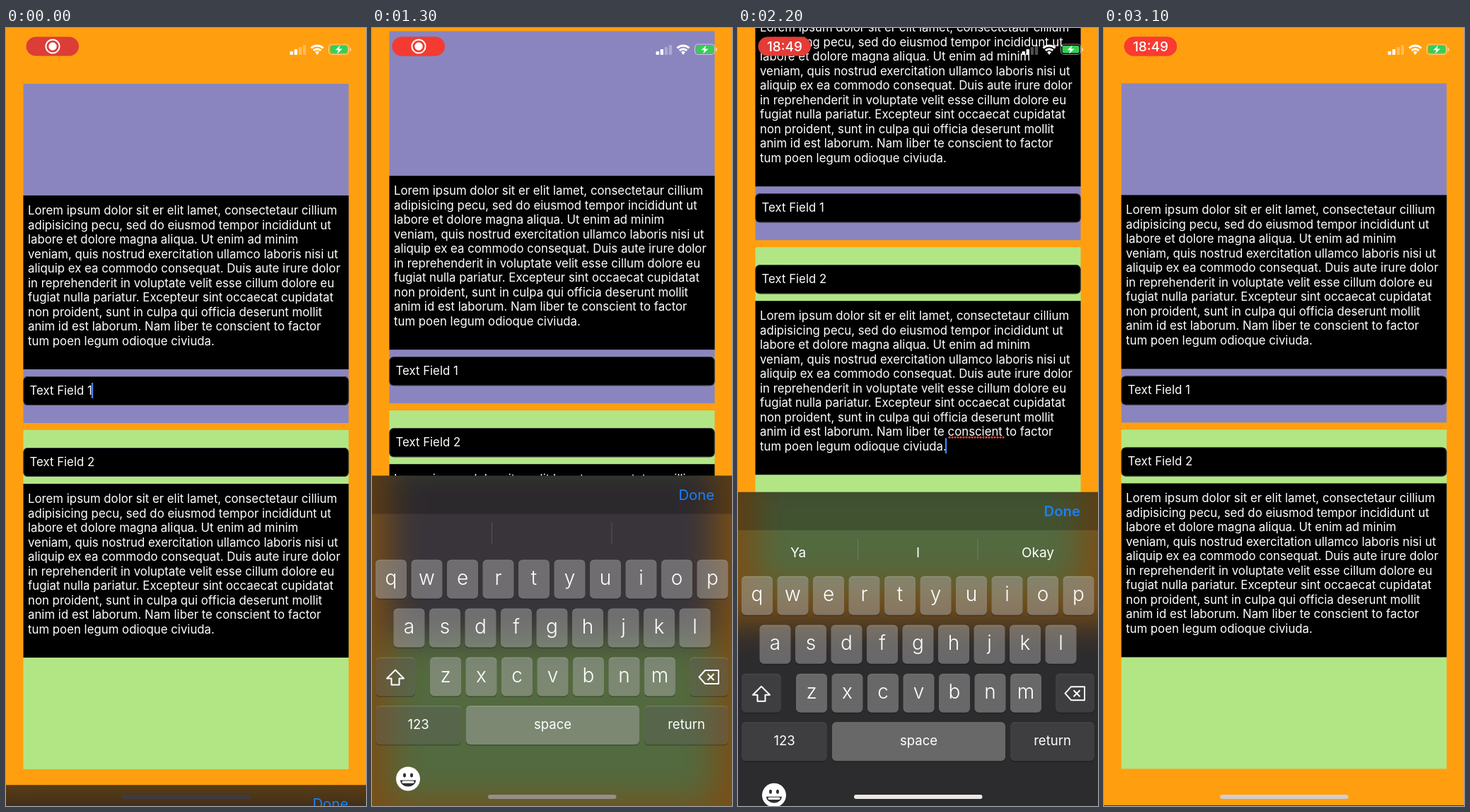
These frames come from a looping animation (509x1101 px, 3.2 s). An HTML page with a canvas:

```html
<!DOCTYPE html>
<html lang="en">
<head>
<meta charset="utf-8">
<title>Keyboard and text fields</title>
<style>
  html, body { margin: 0; width: 100%; height: 100%; overflow: hidden; background: #000; }
  canvas { display: block; width: 509px; height: 1101px; }
</style>
</head>
<body>
<canvas id="stage" width="509" height="1101"></canvas>
<script>
const W = 509, H = 1101, LOOP = 3200, STEP = 100, MARGIN = 80;
const KEYBOARD_HEIGHT = 479;
const FOCUS_1 = -22, FOCUS_2 = 580, DISMISS_1 = 1287, FOCUS_3 = 1965, DISMISS_2 = 2640;
const BLUE = '#1a80fb', RED = '#ff3b30';
const LOREM = [
  'Lorem ipsum dolor sit er elit lamet, consectetaur cillium',
  'adipisicing pecu, sed do eiusmod tempor incididunt ut',
  'labore et dolore magna aliqua. Ut enim ad minim',
  'veniam, quis nostrud exercitation ullamco laboris nisi ut',
  'aliquip ex ea commodo consequat. Duis aute irure dolor',
  'in reprehenderit in voluptate velit esse cillum dolore eu',
  'fugiat nulla pariatur. Excepteur sint occaecat cupidatat',
  'non proident, sunt in culpa qui officia deserunt mollit',
  'anim id est laborum. Nam liber te conscient to factor',
  'tum poen legum odioque civiuda.'
];
const PLAIN = { orange: '#ff9f0f', purple: '#8a85bf', green: '#b2e685', box: '#000', black: '#000' };
const DIMMED = { orange: '#7a4e16', purple: '#4a4860', green: '#53693f', box: '#38343a', black: '#2c2b2d' };
const INDICATOR = [
  [0, 61, 59, 66], [400, 86, 86, 98], [900, 128, 124, 122], [1500, 160, 152, 144],
  [2000, 216, 210, 203], [2400, 255, 255, 255], [3100, 207, 205, 208]
];

const ctx = document.getElementById('stage').getContext('2d');
const backdrop = document.createElement('canvas');
backdrop.width = W + 2 * MARGIN;
backdrop.height = H + 2 * MARGIN;
const backCtx = backdrop.getContext('2d');
const clamp = v => Math.max(0, Math.min(1, v));

// Critically damped spring, 0 to 1
function spring(ms) {
  const x = Math.max(0, ms) * 0.01826;
  return 1 - (1 + x) * Math.exp(-x);
}

function rect(x, y, w, h, color, g = ctx) {
  g.fillStyle = color;
  g.fillRect(x, y, w, h);
}

function roundPath(x, y, w, h, r) {
  ctx.beginPath();
  ctx.roundRect(x, y, w, h, r);
}

function roundRect(x, y, w, h, r, color) {
  roundPath(x, y, w, h, r);
  ctx.fillStyle = color;
  ctx.fill();
}

function disc(x, y, r, color) {
  ctx.beginPath();
  ctx.arc(x, y, r, 0, 7);
  ctx.fillStyle = color;
  ctx.fill();
}

function poly(points, close = true) {
  ctx.beginPath();
  points.forEach(([x, y]) => ctx.lineTo(x, y));
  if (close) ctx.closePath();
}

function text(str, x, y, size = 16.8, align = 'left', weight = 400, color = '#fff') {
  ctx.font = `${weight} ${size}px Inter, "Liberation Sans", sans-serif`;
  ctx.textAlign = align;
  ctx.fillStyle = color;
  ctx.fillText(str, x, y);
}

function panels(g, c, scroll, stretch) {
  const add = (x, y, w, h, color) => rect(x, y - scroll, w, h, color, g);
  const grow = 77 * stretch;
  add(-100, -400, W + 200, H + 400 + grow, c.orange);
  add(-100, H + grow, W + 200, 500, c.black);
  add(24.5, 79 - 49 * stretch, 460, 480 + 49 * stretch, c.purple);
  add(24.5, 569, 460, 480 + grow, c.green);
  add(24.5, 237, 460, 246, c.box);
  add(24.5, 645, 460, 246, c.box);
}

function caret(x, y) {
  rect(x, y, 2.4, 22, '#3f82ea');
}

function field(label, y) {
  roundRect(24.5, y, 460, 41, 6, '#000');
  roundPath(25, y + 0.5, 459, 40, 6);
  ctx.strokeStyle = '#38383b';
  ctx.lineWidth = 1;
  ctx.stroke();
  text(label, 33.5, y + 26);
}

function content(t) {
  field('Text Field 1', 493);
  field('Text Field 2', 594);
  for (const top of [237, 645])
    LOREM.forEach((line, i) => text(line, 31, top + 27 + i * 20.5));
  if (t < FOCUS_2) caret(120.8, 502);
  else if (t < DISMISS_1) caret(123, 603);
  else if (t >= FOCUS_3 && t < DISMISS_2) {
    caret(292.8, 839);
    for (let x = 299; x < 376; x += 4) disc(x, 838, 1.5, '#e8483c');
  }
}

function key(label, x, y, w, alpha, size) {
  roundRect(x, y + 1.5, w, 55, 6, 'rgba(0,0,0,.25)');
  roundRect(x, y, w, 55, 6, `rgba(255,255,255,${alpha})`);
  const big = size > 20;
  text(label, x + w / 2, y + (big ? 35 : 33), size, 'center', big ? 300 : 400);
}

function keyIcons() {
  ctx.strokeStyle = '#fff';
  ctx.lineWidth = 2;
  ctx.lineJoin = 'round';
  poly([[33, 275], [45, 287], [38.5, 287], [38.5, 296], [27.5, 296], [27.5, 287], [21, 287]]);
  ctx.stroke();
  poly([[462.5, 285], [471, 275.5], [490, 275.5], [490, 294.5], [471, 294.5]]);
  ctx.stroke();
  for (const s of [-1, 1]) {
    poly([[474.5, 285 - 4.5 * s], [483.5, 285 + 4.5 * s]], false);
    ctx.stroke();
  }
}

function smiley(x, y) {
  disc(x, y, 17, '#fff');
  ctx.fillStyle = '#303030';
  for (const s of [-1, 1]) {
    ctx.beginPath();
    ctx.ellipse(x + 5 * s, y - 5, 2, 3, 0, 0, 7);
    ctx.fill();
  }
  ctx.beginPath();
  ctx.ellipse(x, y + 2, 11, 9, 0, 0, Math.PI);
  ctx.closePath();
  ctx.fill();
  roundRect(x - 8.5, y + 3, 17, 3.2, 1.6, '#fff');
}

function keyboard(t) {
  rect(0, 0, W, 54, 'rgba(0,0,0,.22)');
  const bold = t > 50 && t < DISMISS_1 || t >= FOCUS_3 && t < DISMISS_2;
  text('Done', 484, 34, 20.3, 'right', bold ? 600 : 400, BLUE);

  const words = t < FOCUS_2 ? ['“1”', '', ''] : t < FOCUS_3 ? ['', '', ''] : ['Ya', 'I', 'Okay'];
  words.forEach((word, i) => text(word, 85 + i * 169.5, 92, 19, 'center'));
  for (const x of [169, 338.5]) rect(x, 66, 1, 31, 'rgba(255,255,255,.16)');

  [['qwertyuiop', 5], ['asdfghjkl', 30.5], ['zxcvbnm', 82]].forEach(([letters, left], row) =>
    [...letters].forEach((ch, i) => key(ch, left + i * 50.5, 119 + row * 69, 44, 0.32, 28)));
  key('', 5, 257, 56, 0.13, 18);
  key('', 449, 257, 55, 0.13, 18);
  key('123', 5, 325.5, 121, 0.13, 18.5);
  key('space', 133, 325.5, 245, 0.32, 18.5);
  key('return', 385, 325.5, 119, 0.13, 18.5);
  keyIcons();
  smiley(51, 429);
}

function statusBar(t) {
  const glow = (1 - Math.cos(t / 1900 * 2 * Math.PI)) / 2;
  const swap = clamp((t - 1950) / 250);
  roundRect(28.5, 12.5, 74.5, 27, 13.5, '#dc3d37');
  ctx.globalAlpha = glow;
  roundRect(28.5, 12.5, 74.5, 27, 13.5, RED);
  ctx.globalAlpha = 1 - swap;
  disc(66, 26, 5.7, '#fff');
  ctx.beginPath();
  ctx.arc(66, 26, 9.6, 0, 7);
  ctx.strokeStyle = '#fff';
  ctx.lineWidth = 2;
  ctx.stroke();
  ctx.globalAlpha = swap;
  text('18:49', 66, 32.5, 19, 'center', 500);
  ctx.globalAlpha = 1;

  for (let i = 0; i < 4; i++) {
    const h = 5 + i * 3;
    roundRect(401.5 + i * 6.1, 38 - h, 4.4, h, 1, i < 2 ? '#fff' : 'rgba(255,255,255,.3)');
  }

  ctx.lineWidth = 3;
  for (const r of [12, 7.3]) {
    ctx.beginPath();
    ctx.arc(440, 37, r, -Math.PI * 0.75, -Math.PI * 0.25);
    ctx.stroke();
  }
  ctx.beginPath();
  ctx.moveTo(440, 38);
  ctx.arc(440, 37, 4, -Math.PI * 0.75, -Math.PI * 0.25);
  ctx.fillStyle = '#fff';
  ctx.fill();

  roundPath(456.5, 23, 28, 14.5, 4.5);
  ctx.strokeStyle = 'rgba(255,255,255,.55)';
  ctx.lineWidth = 1.2;
  ctx.stroke();
  roundRect(458.5, 25, 24, 10.5, 2.5, '#35cf55');
  roundRect(486, 28, 1.8, 5, 1, 'rgba(255,255,255,.55)');
  poly([[472.5, 24.5], [465.5, 31.2], [469.8, 31.2], [468.2, 36.5], [475.5, 29.5], [471, 29.5]]);
  ctx.fillStyle = '#fff';
  ctx.fill();
}

function homeIndicator(t) {
  const last = INDICATOR.length - 2;
  const i = Math.min(last, INDICATOR.findLastIndex(([time]) => time <= t));
  const [a, b] = [INDICATOR[i], INDICATOR[i + 1]];
  const k = clamp((t - a[0]) / (b[0] - a[0]));
  const rgb = [1, 2, 3].map(n => Math.round(a[n] + (b[n] - a[n]) * k));
  roundRect(164, 1085, 181.5, 6, 3, `rgb(${rgb})`);
}

function draw(t) {
  const down1 = spring(t - DISMISS_1);
  const second = spring(t - FOCUS_2) - down1;
  const third = spring(t - FOCUS_3) - spring(t - DISMISS_2);
  const shown = spring(t - FOCUS_1) - down1 + third;
  const scroll = 28.5 * second + 279 * third;
  const stretch = second * second;
  const top = H - KEYBOARD_HEIGHT * shown;

  panels(ctx, PLAIN, scroll, stretch);
  ctx.save();
  ctx.translate(0, -scroll);
  content(t);
  ctx.restore();

  // Frosted backdrop: the same panels, dimmed and blurred
  backCtx.setTransform(1, 0, 0, 1, MARGIN, MARGIN);
  panels(backCtx, DIMMED, scroll, stretch);
  ctx.save();
  ctx.beginPath();
  ctx.rect(0, top, W, H);
  ctx.clip();
  ctx.filter = 'blur(24px)';
  ctx.drawImage(backdrop, -MARGIN, -MARGIN);
  ctx.restore();

  ctx.save();
  ctx.translate(0, top);
  keyboard(t);
  ctx.restore();

  homeIndicator(t);
  statusBar(t);
}

const start = performance.now();
let shownStep = -1;
function tick() {
  const step = Math.floor((performance.now() - start) % LOOP / STEP);
  if (step !== shownStep) draw((shownStep = step) * STEP);
  requestAnimationFrame(tick);
}
tick();
</script>
</body>
</html>
```
